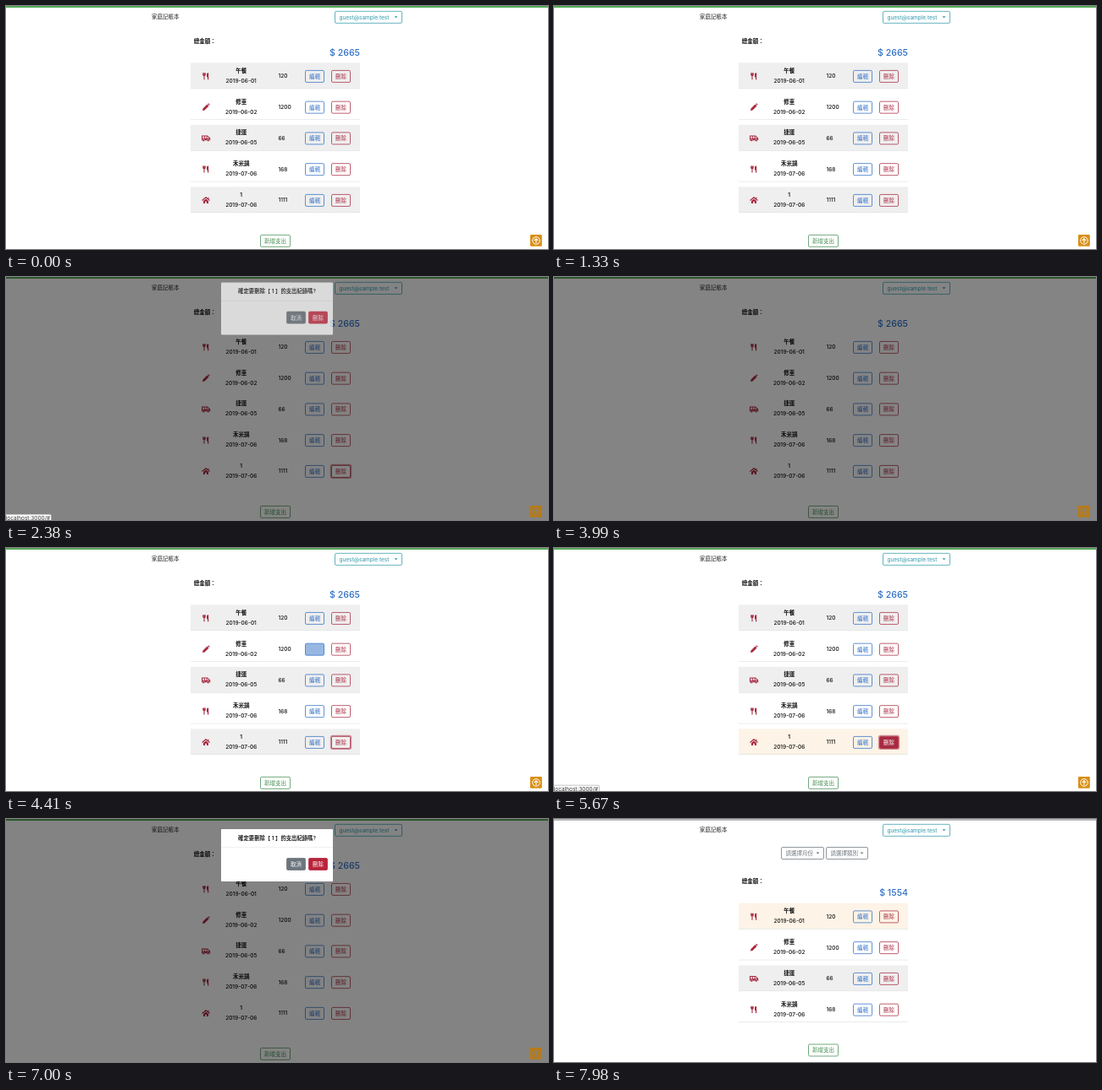
These frames come from a looping animation (640 by 288 pixels, 8 s). An HTML page:

```html
<!DOCTYPE html>
<html lang="zh-Hant">
<head>
<meta charset="utf-8">
<title>家庭記帳本</title>
<style>
html, body { margin: 0; width: 100%; height: 100%; overflow: hidden; background: #fff; }
svg { display: block; width: 100%; height: 100%; }
text { font: 6.5px Inter, "Noto Sans CJK TC", "Noto Sans CJK", sans-serif; white-space: pre; }
</style>
</head>
<body>
<svg id="stage" viewBox="0 0 640 288"></svg>
<script>
const LOOP = 8000, RELOAD = 7140, DIM = .485;
const BLUE = '#2f6fc6', RED = '#a82a40', TEAL = '#2f98aa', GREEN = '#438e50', GRAY = '#6c757d';
const MEDIUM = 'font-weight:500', BOLD = 'font-weight:600';
const stage = document.getElementById('stage');

const rows = [
  ['fork', '午餐', '2019-06-01', 120],
  ['pencil', '修車', '2019-06-02', 1200],
  ['van', '捷運', '2019-06-05', 66],
  ['fork', '禾米鍋', '2019-07-06', 168],
  ['home', '1', '2019-07-06', 1111]
];

const icons = {
  fork: `<path d="M-3.2-4v2.4q0 1 1.2 1t1.2-1V-4M-2-4V4" fill="none" stroke="${RED}" stroke-width="1.1"/>
    <path d="M1 4V-3q.3-1 2.2-1V4H2V1H1z"/>`,
  pencil: '<path d="M-4 4l.5-2.5L1.5-3.4l2 2L-1.5 3.5zM2.1-3.9l.6-.5q.5-.3 1 .1l.6.7q.4.5 0 1l-.5.5z"/>',
  van: `<path fill-rule="evenodd" d="M-5-3.3H2L5.2-.2V2.6H-5zM-4-2.2V0h1.8v-2.2zM-1.3-2.2V0H.7v-2.2zM1.6-2.2V0h2.1L1.9-2.2z"/>
    <g stroke="#efefef" stroke-width=".5"><circle cx="-2.7" cy="2.5" r="1.4"/><circle cx="2.7" cy="2.5" r="1.4"/></g>`,
  home: `<path d="M-4.5.3L0-3.4 4.5.3M2.9-3.4v2" fill="none" stroke="${RED}" stroke-width="1.1"/>
    <path d="M-3 .8L0-1.7 3 .8V3.9H.9V1.5H-.9V3.9H-3z"/>`
};

const ramp = (t, start, length) => Math.min(1, Math.max(0, (t - start) / length));
const pulse = (t, from, to) => ramp(t, from, 150) - ramp(t, to, 150);
const within = (t, from, to) => t >= from && t < to;
const mix = (a, share, b) => `color-mix(in srgb, ${a} ${share * 100}%, ${b})`;

// y is the vertical middle of the line
const text = (x, y, s, fill = '#222', anchor = 'start', style = '') =>
  `<text x="${x}" y="${y + 2.35}" fill="${fill}" text-anchor="${anchor}" style="${style}">${s}</text>`;

const rect = (x, y, w, h, attrs) => `<rect x="${x}" y="${y}" width="${w}" height="${h}" ${attrs}/>`;

function button(x, y, w, label, color, hover = 0, focus = false) {
  const ring = focus ? rect(x - .9, y - .9, w + 1.8, 15.8, `rx="2" fill="none" stroke="${color}" stroke-opacity=".5" stroke-width="1.5"`) : '';
  return ring + rect(x, y, w, 14, `rx="1.4" fill="${color}" fill-opacity="${hover}" stroke="${color}" stroke-width=".75"`) +
    text(x + w / 2, y + 7.1, label, mix('white', hover, color), 'middle', MEDIUM);
}

function dropdown(x, y, w, label, color) {
  return rect(x, y, w, 14, `rx="1.4" fill="none" stroke="${color}" stroke-width=".75"`) +
    text(x + 5, y + 7.1, label, color) +
    `<path d="M${x + w - 9} ${y + 6}h4l-2 2z" fill="${color}"/>`;
}

function row([icon, name, date, amount], i, t) {
  const y = 67.3 + 36.75 * i, mid = y + 15.7, last = i === 4;
  const hovered = i === 0 ? t >= RELOAD + 150
    : last && (within(t, 1600, 2080) || within(t, 4690, 5840));
  const fill = hovered ? '#fdf3e6' : i % 2 ? '#fff' : '#efefef';
  const visible = 1 - (dimming(t) / DIM) ** 4;
  const editHover = i === 1 ? pulse(t, 4230, 4335) : 0;
  const deleteHover = last ? pulse(t, 1650, 2090) + pulse(t, 4720, 5860) : 0;
  // Focus moves into the dialog once it is open and comes back when it closes
  const focus = last && (within(t, 2040, 2530) || within(t, 4140, 6290));
  return `<g opacity="${visible}">` + rect(218, y, 200, 30.5, `fill="${fill}"`) +
    rect(218, y + 30.2, 200, .6, 'fill="#dcdfe2"') + '</g>' +
    `<g transform="translate(236 ${mid + .2})" fill="${RED}">${icons[icon]}</g>` +
    text(277.7, y + 9.2, name, '#111', 'middle', BOLD) +
    text(277.7, y + 21.1, date, '#111', 'middle', MEDIUM) +
    text(321.5, mid, amount, '#111', 'start', MEDIUM) +
    button(353.5, mid - 6.6, 22, '編輯', BLUE, editHover) +
    button(384.5, mid - 6.6, 22, '刪除', RED, deleteHover, focus);
}

// Backdrop opacity
function dimming(t) {
  if (t >= RELOAD) return 0;
  return DIM * (ramp(t, 2080, 150) - ramp(t, 3990, 150) + ramp(t, 5840, 150));
}

function modal(t) {
  if (t >= RELOAD) return '';
  const second = t > 5000;
  const start = second ? 5990 : 2230;
  const close = second ? 1 : 1 - ramp(t, 3780, 200);
  const opacity = ramp(t, start, 215) * close;
  if (!opacity) return '';
  const ease = p => 1 - (1 - p) ** 2;
  const y = -10 + 22 * ease(ramp(t, start, 300)) * ease(close);
  const cancel = within(t, 3200, 4000) ? '#5a6268' : GRAY;
  const confirm = within(t, 6600, RELOAD) ? '#b8233a' : '#cc2f45';
  return `<g transform="translate(254 ${y})" opacity="${opacity}">` +
    rect(0, 0, 132, 62, 'rx="1" fill="#fff"') +
    rect(0, 21.5, 132, .5, 'fill="#dee2e6"') +
    text(66, 10.3, '確定要刪除【 1 】的支出紀錄嗎?', '#222', 'middle', 'font-size:6.35px;' + BOLD) +
    button(77.5, 34.5, 22, '取消', cancel, 1) +
    button(103.5, 34.5, 22, '刪除', confirm, 1) + '</g>';
}

function status(t) {
  if (!within(t, 1650, 2700) && !within(t, 4900, 6250)) return '';
  return rect(-2, 281.2, 55.5, 9, 'rx="1.5" fill="#fff" stroke="#888" stroke-width=".5"') +
    text(-.3, 286, 'localhost:3000/#', '#333');
}

function toTop(dim) {
  const white = mix('black', dim, '#fff');
  return rect(619, 271, 13.8, 13.8, `rx="1" fill="${mix('black', dim * .3, '#d98f14')}"`) +
    `<g fill="none" stroke="${white}"><circle cx="626" cy="278" r="4.3"/>
    <path d="M626 281v-5.2M623.8 278l2.2-2.3 2.2 2.3" stroke-width="1.1"/></g>`;
}

function render(t) {
  const reloaded = t >= RELOAD, dim = dimming(t);
  const list = reloaded ? rows.slice(0, 4) : rows;
  const total = list.reduce((sum, r) => sum + r[3], 0);
  const filters = reloaded
    ? dropdown(268.5, 33.5, 50, '請選擇月份', GRAY) + dropdown(321.5, 33.5, 49, '請選擇類別', GRAY) : '';
  stage.innerHTML = rect(0, 0, 640, 288, 'fill="#fff"') +
    rect(0, 0, 640, 2, `fill="${reloaded ? '#b9b9b9' : '#57a957'}"`) +
    text(172, 13, '家庭記帳本') +
    dropdown(388.5, 6.3, 79, 'guest@sample.test', TEAL) + filters +
    `<g transform="translate(0 ${reloaded ? 32.5 : 0})">` +
    text(221.7, 41.3, '總金額：', '#111', 'start', BOLD) +
    text(418, 56.4, '$ ' + total, BLUE, 'end', 'font-size:10.6px;' + MEDIUM) +
    list.map((r, i) => row(r, i, t)).join('') + '</g>' +
    button(300.5, reloaded ? 267 : 271.4, 35, '新增支出', GREEN) +
    rect(0, 0, 640, 288, `fill="#000" opacity="${dim}"`) +
    (reloaded ? '' : toTop(dim)) + modal(t) + status(t);
}

function tick() {
  render(performance.now() % LOOP);
  requestAnimationFrame(tick);
}
tick();
</script>
</body>
</html>
```
